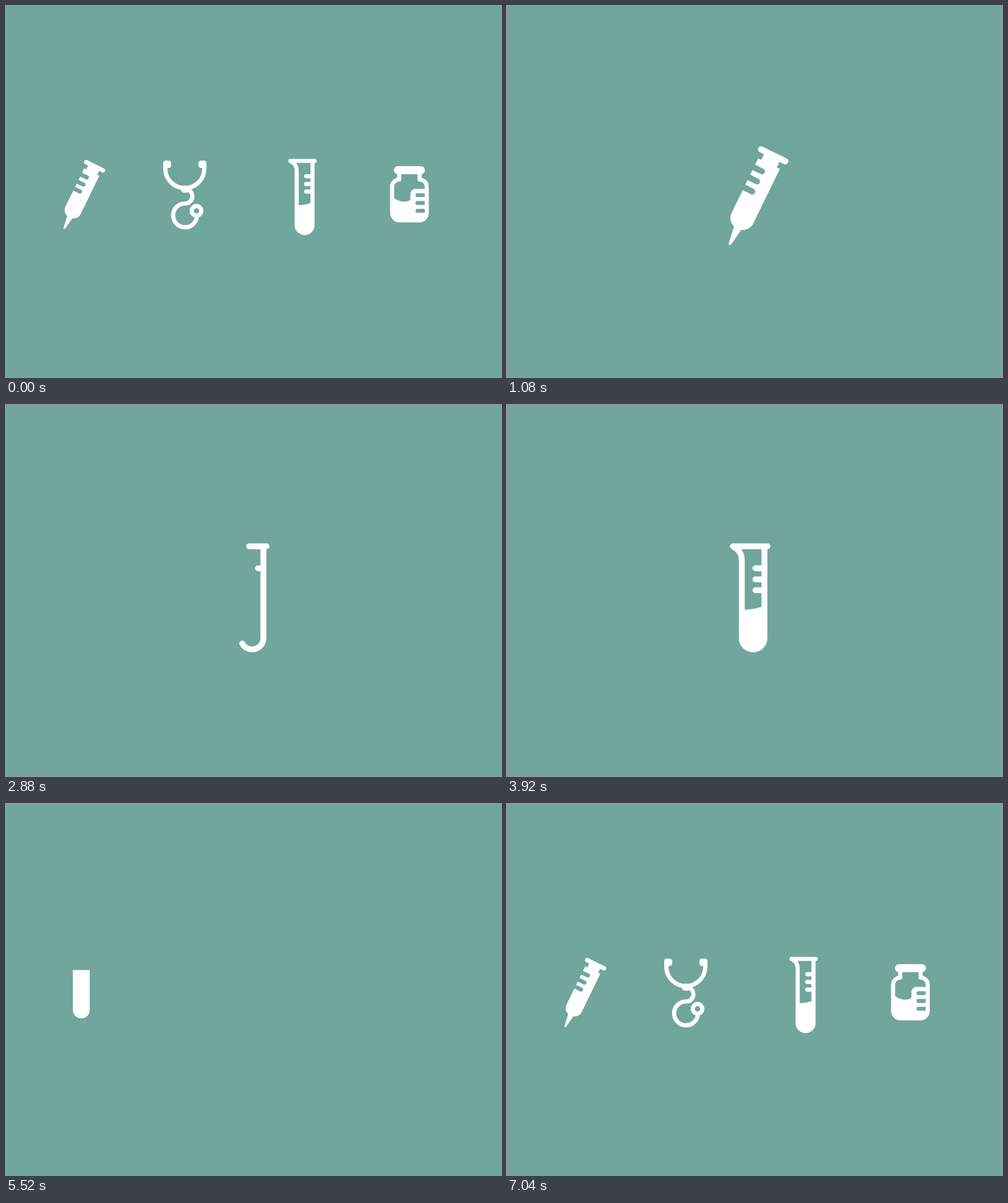
An HTML page for the animation above (7.68 s loop, 800 by 600 pixels).

```html
<!DOCTYPE html>
<html lang="en">
<head>
<meta charset="utf-8">
<title>Medical icons</title>
<style>
  html, body { margin: 0; width: 100%; height: 100%; overflow: hidden; background: #71a69d; }
  svg { display: block; width: 100vw; height: 100vh; }
</style>
</head>
<body>
<svg viewBox="0 0 800 600">
  <defs>
    <clipPath id="tubeInside"><rect x="379.5" y="229" width="36.5" height="166" rx="18.2"/></clipPath>
    <clipPath id="jarInside"><rect x="357" y="250" width="80" height="94.3" rx="17"/></clipPath>
  </defs>
  <rect width="800" height="600" fill="#71a69d"/>
  <g id="stage" fill="#fff" stroke-linecap="round" stroke-linejoin="round"></g>
</svg>
<script>
const BG = '#71a69d', LOOP = 7680, STEP = 40;
const stage = document.getElementById('stage');

const span = (t, a, b) => Math.min(1, Math.max(0, (t - a) / (b - a)));
const mix = (a, b, p) => a + (b - a) * p;
const out = p => 1 - (1 - p) ** 3;
const inOut = p => p < .5 ? 2 * p * p : 1 - 2 * (1 - p) ** 2;

// Eased value through [time, value] pairs
function keys(t, pairs) {
  let v = pairs[0][1];
  for (let i = 1; i < pairs.length; i++) {
    const [a, from] = pairs[i - 1], [b, to] = pairs[i];
    if (t >= a) v = mix(from, to, inOut(span(t, a, b)));
  }
  return v;
}

const group = (transform, body) => `<g transform="${transform}">${body}</g>`;
const shape = (d, extra = '') => `<path d="${d}" ${extra}/>`;

// Stroke drawn up to the fraction p of its length
const line = (d, p = 1, width = 9.5, color = '#fff') => p <= 0 ? '' :
  `<path d="${d}" fill="none" stroke="${color}" stroke-width="${width}"` +
  (p < 1 ? ` pathLength="1" stroke-dasharray="${p} 2"` : '') + '/>';

// Rectangle that grows around its centre
const pill = (cx, cy, w, h, r, px, py = px) => px <= 0 ? '' :
  group(`translate(${cx} ${cy}) scale(${px} ${py})`,
    `<rect x="${-w / 2}" y="${-h / 2}" width="${w}" height="${h}" rx="${r}"/>`);

function syringe(t) {
  if (t <= 0) return '';
  const angle = 26 * out(span(t, 280, 1060));
  const top = mix(113, 15, out(span(t, 0, 260)));
  const pull = -16 * (1 - inOut(span(t, 440, 760)));
  let s = '';
  if (t > 500) {
    const hide = -30 * (1 - inOut(span(t, 560, 800)));
    s += group(`translate(0 ${hide})`, shape('M-6.5 130L-2 160Q0 162.5 2 160L6.5 130Z'));
  }
  s += shape(`M-19.5 ${top}H19.5V113A19 19 0 0 1 .5 132H-.5A19 19 0 0 1 -19.5 113Z`);
  const rise = out(span(t, 160, 320));
  if (rise > 0) {
    const y = mix(20, pull, rise), half = 21.7 * out(span(t, 220, 380));
    s += shape(`M-14 20V${y}H14V20Z`);
    if (half > 0) s += line(`M${-half} ${y}H${half}`, 1, 10);
  }
  [31.2, 49.3, 67.3].forEach((y, i) => {
    const p = out(span(t, 300 + i * 70, 440 + i * 70));
    if (p > 0) s += line(`M-26 ${y}H${mix(-25, -4.7, p)}`, 1, 9.6, BG);
  });
  return group(`translate(399.4 304.4) rotate(${angle}) translate(0 -70)`, s);
}

// Released pendulum: quick fall, then a strongly damped overshoot
function swing(t) {
  const s = t - 250, w = Math.PI / 550;
  if (s < 0) return 1;
  if (s < 275) return Math.exp(-.0014 * s) * Math.cos(w * s);
  const u = s - 275;
  return -.68 * Math.exp(-.01 * u) * Math.sin(w * u);
}

function stethoscope(t) {
  if (t <= 0) return '';
  const k = swing(t);
  const chest = out(span(t, 520, 760));
  let tail = line('M8 -11A16.5 16.5 0 0 1 1 20.5A27.5 27.5 0 1 0 28 48', span(t, 160, 508), 9.8);
  if (chest > 0) tail += group(`translate(27 37.5) scale(${chest})`,
    `<circle r="11" fill="${BG}" stroke="#fff" stroke-width="9.8"/>`);
  const body = line('M-45 -71V-60A45 45 0 0 0 45 -60V-70', inOut(span(t, 0, 300)), 9.8) +
    pill(-40.7, -70, 18.5, 17, 6, out(span(t, 200, 340))) +
    pill(40.7, -70, 18.5, 17, 6, out(span(t, 470, 640))) +
    pill(1, -12.5, 19.5, 16.5, 7, out(span(t, 120, 240)));
  return group(`translate(${399 - 5.6 * k} ${307 + 18 * k}) rotate(${22 * k} 0 -60)`,
    group(`rotate(${68 * k} 1 -12.5)`, tail) + body);
}

function tube(t) {
  if (t <= 0) return '';
  const capLeft = keys(t, [[0, 421], [120, 382], [280, 404], [320, 404], [480, 365]]);
  let s = line(`M421 228.5H${capLeft}`);
  s += line('M416 229V377A18.25 18.25 0 0 1 379.5 377V252Q379.5 236 367 230', span(t, 9, 294) ** 1.5);
  [264, 282, 299.5].forEach((y, i) => {
    const p = out(span(t, 180 + i * 75, 290 + i * 75));
    if (p > 0) s += line(`M414 ${y}H${mix(412, 401.5, p)}`);
  });
  const fill = span(t, 240, 1000);
  if (fill > 0) {
    const level = mix(391, 327.3, out(fill));
    const fade = 1 - span(t, 240, 1280);
    const tilt = 3.3 - 9 * fade * fade * Math.cos((t - 240) / 90) * span(t, 180, 300);
    const sag = 5 * out(fill);
    s += shape(`M379 ${level + tilt}Q398 ${level + sag} 417 ${level - tilt}V400H379Z`,
      'clip-path="url(#tubeInside)"');
  }
  return s;
}

function jar(t) {
  if (t <= 0) return '';
  const drop = keys(t, [[0, -31], [340, -31], [440, 6], [520, 0]]);
  const lidY = mix(226.2, 228.2, inOut(span(t, 520, 620)));
  let s = line('M373.5 229V250A16.5 16.5 0 0 0 357 266.5V327A17.3 17.3 0 0 0 374.3 344.3' +
    'H419.7A17.3 17.3 0 0 0 437 327V266.5A16.5 16.5 0 0 0 420.5 250V229', inOut(span(t, 0, 300)), 9.4);
  s += pill(397, lidY, 71.6, 18.4, 9.2, out(span(t, 260, 360)), 1);

  const fill = span(t, 480, 1080);
  let inside = '';
  if (fill > 0) {
    const level = mix(341, 294, out(fill));
    const fade = (1 - fill) ** 2;
    const bend = mix(-4, 14, inOut(span(t, 500, 900))) + 8 * fade * Math.sin((t - 520) / 80);
    const tilt = 2 * inOut(span(t, 560, 1000));
    inside += shape(`M360 ${level - tilt}Q382 ${level + bend} 401 ${level + tilt}V346H350V${level - tilt}Z`);
  }
  const panel = out(span(t, 300, 440));
  if (panel > 0) inside += group(`translate(437 0) scale(${panel} 1) translate(-437 0)`,
    shape('M437 271.5H411.5Q404 271.5 399.3 280V346H437Z'));
  s += `<g clip-path="url(#jarInside)">${inside}</g>`;
  [286, 304, 322].forEach((y, i) => {
    const p = out(span(t, 350 + i * 30, 440 + i * 30));
    if (p > 0) s += shape(`M432.3 ${y - 4.6}H${mix(432, 415.6, p)}a4.6 4.6 0 0 0 0 9.2H432.3Z`, `fill="${BG}"`);
  });
  return group(`translate(0 ${drop})`, s);
}

// Solo start time, and where each icon sits in the row
const icons = [
  { draw: syringe, start: 20, from: '-399.4 -304.4', to: '121.7 303.2' },
  { draw: stethoscope, start: 1360, from: '-399 -307', to: '289 305' },
  { draw: tube, start: 2680, from: '-400 -300', to: '484.15 300.5' },
  { draw: jar, start: 4000, from: '-397 -219', to: '652 259' }
];
const ROW = 5280;

function render(ms) {
  let t = Math.floor(ms % LOOP / STEP) * STEP;
  if (t < STEP) t += LOOP;
  if (t < ROW) {
    const icon = icons.filter(i => t >= i.start).pop();
    stage.innerHTML = icon.draw(t - icon.start);
  } else {
    stage.innerHTML = icons.map((icon, i) =>
      group(`translate(${icon.to}) scale(.7) translate(${icon.from})`, icon.draw(t - ROW - 80 - i * 200))
    ).join('');
  }
}

const begin = performance.now();
function tick() {
  render(performance.now() - begin);
  requestAnimationFrame(tick);
}
tick();
</script>
</body>
</html>
```
